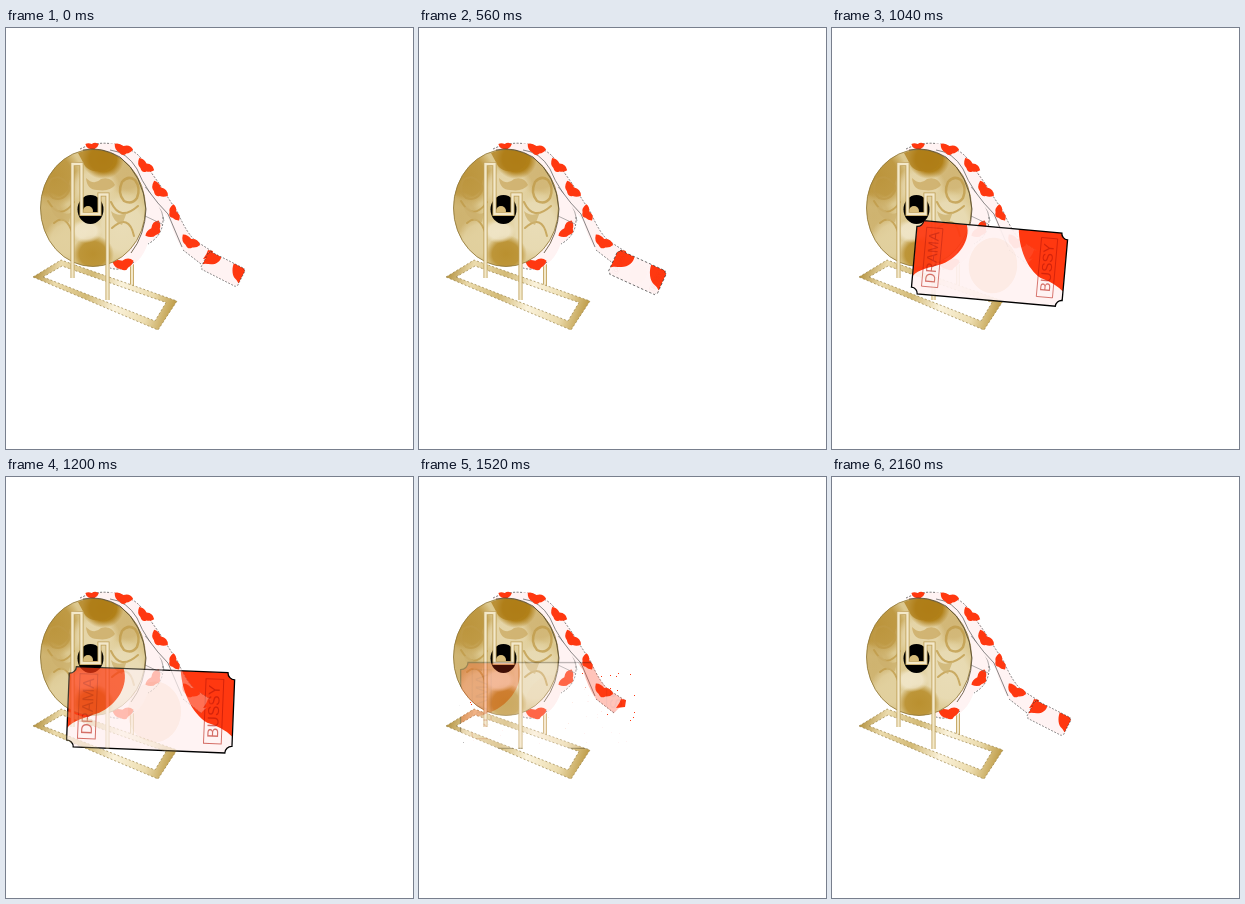
Recreate the animation shown at these times as an HTML page with a canvas. Size 407 by 421 pixels, loop 2.2 s.

```html
<!DOCTYPE html>
<html lang="en">
<head>
<meta charset="utf-8">
<title>Ticket roll</title>
<style>
html, body { margin: 0; width: 100%; height: 100%; overflow: hidden; background: #fff; }
canvas { display: block; }
</style>
</head>
<body>
<canvas id="stage" width="407" height="421"></canvas>
<script>
const W = 407, H = 421, LOOP = 2200, STEP = 40;
const RED = '#ff3810', PAPER = '#fff3f3', GOLD = '#bf9a47';
const out = document.getElementById('stage').getContext('2d');

function layer() {
  const c = document.createElement('canvas');
  c.width = W;
  c.height = H;
  return c.getContext('2d', { willReadFrequently: true });
}

const clamp = v => Math.max(0, Math.min(1, v));

function shape(c, d, fill, stroke, width = 1) {
  const p = new Path2D(d);
  if (fill) { c.fillStyle = fill; c.fill(p); }
  if (stroke) { c.strokeStyle = stroke; c.lineWidth = width; c.stroke(p); }
}

function glow(c, x, y, rx, ry, rgb, alpha) {
  c.save();
  c.translate(x, y);
  c.scale(rx, ry);
  const g = c.createRadialGradient(0, 0, 0, 0, 0, 1);
  g.addColorStop(0, `rgba(${rgb},${alpha})`);
  g.addColorStop(0.65, `rgba(${rgb},${alpha * 0.9})`);
  g.addColorStop(1, `rgba(${rgb},0)`);
  c.fillStyle = g;
  c.fillRect(-1, -1, 2, 2);
  c.restore();
}

// Two-lobed red patch on the rolled tickets
function spot(c, x, y, deg, size = 1) {
  c.save();
  c.translate(x, y);
  c.rotate(deg * Math.PI / 180);
  c.scale(size, size);
  shape(c, 'M-9 -4Q-5 -6 0 -3Q6 -6 10 -1Q8 3 4 4Q1 8 -3 4Q-8 3 -9 -4Z', RED);
  c.restore();
}

function drawRoll(c) {
  shape(c, 'M74 121Q92 112 112 117Q130 122 141 138Q154 157 158 183Q157 209 142 215Q135 236 118 241Q110 243 103 239Z',
    PAPER);
  c.setLineDash([2, 1.5]);
  shape(c, 'M74 121Q92 112 112 117Q130 122 141 138M157 189Q158 207 142 216M128 234Q117 244 104 240', null, '#555', 0.8);
  c.setLineDash([]);
  spot(c, 148, 202, -58, 1.05);
  spot(c, 117, 236, -12, 1.1);
  shape(c, 'M139 159Q155 174 158 193M139 188L156 196', null, '#777', 0.6);

  shape(c, 'M103 115Q121 117 133 127Q144 139 152 154L172 185Q181 206 190 213L207 224L195 236L177 222Q169 211 164 193L148 173Q139 151 131 139Q121 127 104 121Z',
    PAPER);
  c.setLineDash([2, 1.5]);
  shape(c, 'M112 117Q127 121 134 129L152 154L172 185Q181 206 190 213L207 224M195 236L177 222', null, '#666', 0.8);
  c.setLineDash([]);
  shape(c, 'M104 122Q121 124 131 141Q140 164 162 186L176 219', null, '#555', 0.7);
  spot(c, 86, 118, -8, 0.7);
  spot(c, 117, 121, 8);
  spot(c, 139, 138, 30);
  spot(c, 153, 162, 38, 1.05);
  spot(c, 168, 185, 62, 0.9);
  spot(c, 184, 214, 22, 1.05);
  shape(c, 'M207 223L206 230L197 231Q201 226 202 222Z', RED);
}

function drawWheel(c) {
  c.save();
  c.beginPath();
  c.ellipse(87, 180, 52.5, 58.5, 0, 0, 7);
  c.clip();
  c.fillStyle = '#dcc88f';
  c.fillRect(30, 115, 115, 130);
  glow(c, 47, 148, 29, 32, '186,146,56', 0.95);
  glow(c, 42, 188, 22, 24, '203,174,104', 0.8);
  glow(c, 121, 146, 22, 22, '207,178,112', 0.8);
  glow(c, 88, 158, 26, 20, '231,216,174', 0.85);
  glow(c, 116, 198, 30, 36, '234,222,186', 0.9);
  glow(c, 60, 211, 22, 22, '226,209,160', 0.9);
  glow(c, 97, 131, 21, 20, '173,122,14', 1);
  glow(c, 87, 226, 21, 19, '184,141,42', 0.95);
  glow(c, 80, 203, 16, 12, '244,235,211', 0.8);

  // Embossed relief
  c.globalAlpha = 0.75;
  c.lineCap = 'round';
  shape(c, 'M72 125Q82 120 92 123L108 125Q108 136 104 139Q98 145 92 143Q84 144 79 138Z', '#af7e18');
  shape(c, 'M44 152Q52 146 59 153Q67 159 61 166Q56 173 47 170Q39 163 44 152Z', null, GOLD, 2);
  shape(c, 'M116 154Q122 147 129 152Q135 160 131 170Q126 177 118 173Q111 165 116 154Z', null, GOLD, 2.5);
  shape(c, 'M42 173Q54 194 68 174M105 174Q114 194 132 178M48 195Q60 184 67 207M106 200Q123 185 128 208', null, GOLD, 2);
  shape(c, 'M80 150Q88 158 95 151Q105 148 109 157Q104 164 91 162Q81 162 80 150Z', '#cbaa62');
  shape(c, 'M49 177Q54 188 65 185L63 194Q48 192 45 180M105 183Q113 190 121 184L116 197Q107 194 105 183Z', '#cdb06c');
  c.globalAlpha = 1;
  c.restore();
  c.beginPath();
  c.ellipse(87, 180, 52.5, 58.5, 0, 0, 7);
  c.strokeStyle = '#8d7435';
  c.lineWidth = 0.8;
  c.stroke();
  shape(c, 'M77 122Q95 118 114 129Q137 147 140 181Q139 207 125 225', null, '#53482f', 0.8);
}

function drawStand(c) {
  const gold = c.createLinearGradient(27, 245, 171, 292);
  [['#b08d38', 0], ['#ecdcae', 0.16], ['#d3ba76', 0.38], ['#fbf3dc', 0.58], ['#ecdcae', 0.8], ['#b38c2e', 1]]
    .forEach(([color, at]) => gold.addColorStop(at, color));
  const base = new Path2D('M27 249L55 232L171 273L152 302ZM37 249L56 238L160 274.5L149 293Z');
  c.fillStyle = gold;
  c.fill(base, 'evenodd');
  c.setLineDash([2, 2]);
  c.strokeStyle = '#9a8144';
  c.lineWidth = 0.7;
  c.stroke(base);
  c.setLineDash([]);
}

function post(c, d) {
  shape(c, d, null, '#bd9d55', 4);
  shape(c, d, null, '#f3e8c9', 2.4);
}

function drawScene(c) {
  post(c, 'M126 234V258');
  drawStand(c);
  drawRoll(c);
  drawWheel(c);
  c.beginPath();
  c.ellipse(84.5, 181.5, 13, 14.5, 0, 0, 7);
  c.fillStyle = '#000';
  c.fill();
  c.beginPath();
  c.arc(82, 183, 5, 0, 7);
  c.fillStyle = '#d8bd7c';
  c.fill();
  post(c, 'M66.5 250V136H75.5V186H93.5V166.5H101.5V272');
}

const REST = { x: 217, y: 241, w: 41, h: 20, deg: 27 };
const TORN = { x: 225, y: 245.3, w: 41, h: 20, deg: 27 };
const NEAR = { x: 128, y: 227, w: 177, h: 86, deg: 0 };
const TEAR = 520, GONE = 1680;

const mix = (a, b, u) => a + (b - a) * u;
const easeOut = (u, power) => 1 - (1 - u) ** power;

// Pulled off along the strip, then flung towards the viewer
function poseAt(t) {
  if (t < TEAR) {
    const u = (t / TEAR) ** 2;
    return { ...REST, x: mix(REST.x, TORN.x, u), y: mix(REST.y, TORN.y, u) };
  }
  const u = clamp((t - TEAR) / (GONE - TEAR)), grow = easeOut(u, 2.8);
  return {
    x: mix(TORN.x, NEAR.x, easeOut(u, 2)),
    y: mix(TORN.y, NEAR.y, easeOut(u, 1.3)),
    w: mix(TORN.w, NEAR.w, grow),
    h: mix(TORN.h, NEAR.h, grow),
    deg: mix(TORN.deg, NEAR.deg, grow)
  };
}

const TICKET = new Path2D(
  'M-77 -41H77A7 7 0 0 0 84 -34V34A7 7 0 0 0 77 41H-77A7 7 0 0 0 -84 34V-34A7 7 0 0 0 -77 -41Z');

function label(c, text, x) {
  c.strokeStyle = c.fillStyle = '#b81508';
  c.lineWidth = 1;
  c.strokeRect(x - 9, -34, 18, 66);
  c.save();
  c.translate(x, -1);
  c.rotate(-Math.PI / 2);
  c.fillText(text, 0, 1);
  c.restore();
}

function drawTicket(c, { x, y, w, h, deg }) {
  c.save();
  c.translate(x, y);
  c.rotate(deg * Math.PI / 180);
  c.scale(w / 168, h / 82);
  const detail = clamp((w - 45) / 60);
  c.save();
  c.clip(TICKET);
  c.fillStyle = PAPER;
  c.fillRect(-84, -41, 168, 82);
  c.globalAlpha = detail;
  c.beginPath();
  c.ellipse(4, 2, 27, 31, 0, 0, 7);
  c.fillStyle = '#fdebe5';
  c.fill();
  c.globalAlpha = 1;
  shape(c, 'M-84 -41H-29C-23 -24 -34 -4 -52 5C-66 11 -78 13 -84 22Z', RED);
  shape(c, 'M84 -41H29C31 -20 42 2 58 11Q74 15 84 24Z', RED);
  c.globalAlpha = detail * 0.6;
  c.font = '16px "Liberation Sans", Arial, sans-serif';
  c.textAlign = 'center';
  c.textBaseline = 'middle';
  label(c, 'DRAMA', -64);
  label(c, 'BUSSY', 64);
  c.restore();
  c.globalAlpha = 0.5 + 0.5 * detail;
  c.strokeStyle = '#000';
  c.lineWidth = (0.8 + 0.5 * detail) * 168 / w;
  if (w < 60) c.setLineDash([8, 6]);
  c.stroke(TICKET);
  c.restore();
}

const noise = new Float32Array(W * H);
let seed = 7;
for (let i = 0; i < noise.length; i++) {
  seed = (Math.imul(seed, 1664525) + 1013904223) >>> 0;
  noise[i] = seed / 4294967296;
}

// Keeps a share of the ticket's pixels
function dissolve(pose, share) {
  spare.clearRect(0, 0, W, H);
  drawTicket(spare, pose);
  if (share >= 1) return;
  const image = spare.getImageData(0, 0, W, H);
  for (let i = 0; i < noise.length; i++) {
    if (noise[i] >= share) image.data[i * 4 + 3] = 0;
  }
  spare.putImageData(image, 0, 0);
}

const scene = layer(), blend = layer(), spare = layer();
drawScene(scene);

function render(t) {
  blend.clearRect(0, 0, W, H);
  blend.drawImage(scene.canvas, 0, 0);
  if (t <= GONE) {
    const alpha = clamp((1700 - t) / 710), pose = poseAt(t);
    // The ticket fades over the reel but crumbles against the blank backdrop
    dissolve(pose, 1);
    blend.globalCompositeOperation = 'source-atop';
    blend.globalAlpha = alpha;
    blend.drawImage(spare.canvas, 0, 0);
    blend.globalAlpha = 1;
    blend.globalCompositeOperation = 'destination-over';
    dissolve(pose, clamp((alpha - 0.22) * 2.2) ** 2);
    blend.drawImage(spare.canvas, 0, 0);
    blend.globalCompositeOperation = 'source-over';
  } else {
    dissolve(REST, clamp((t - GONE) / 440) ** 2);
    blend.drawImage(spare.canvas, 0, 0);
  }
  out.clearRect(0, 0, W, H);
  out.drawImage(blend.canvas, 0, 0);
}

let start;
function tick(now) {
  start ??= now;
  render(Math.floor((now - start) % LOOP / STEP) * STEP);
  requestAnimationFrame(tick);
}
render(0);
requestAnimationFrame(tick);
</script>
</body>
</html>
```
